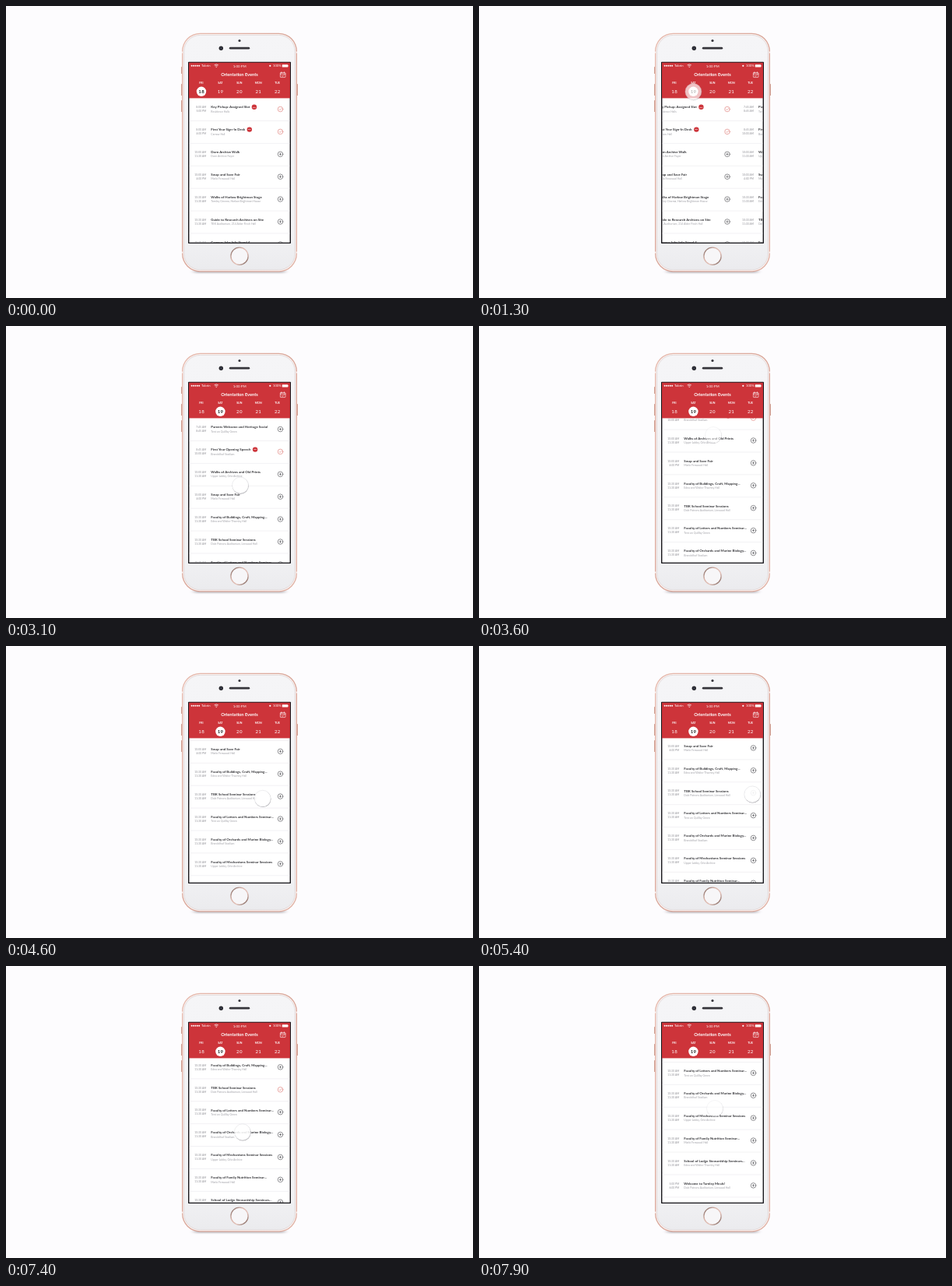
These frames come from a looping animation (600x375 px, 8 s). An HTML page:

```html
<!DOCTYPE html>
<html lang="en">
<head>
<meta charset="utf-8">
<title>Orientation Events</title>
<style>
html, body { margin: 0; width: 100%; height: 100%; overflow: hidden; background: #fdfcfe; }
svg { display: block; width: 100vw; height: 100vh; font-family: Lato, "Open Sans", sans-serif; }
.mid { text-anchor: middle; }
.time { text-anchor: end; font-size: 3.4px; fill: #929298; }
.name { font-size: 4.4px; font-weight: 700; fill: #303034; }
.place { font-size: 3.5px; fill: #a2a2a8; }
.line { stroke: #e9e8ec; stroke-width: .6; }
.icon { fill: none; stroke-width: .6; stroke-linecap: round; stroke-linejoin: round; }
.day { font-size: 3.5px; font-weight: 700; fill: #fff; }
.date { font-size: 6.1px; letter-spacing: .3px; fill: #fff; }
.date.on { font-weight: 700; fill: #222; }
</style>
</head>
<body>
<svg id="stage" viewBox="0 0 600 375">
  <defs>
    <linearGradient id="rose" x1="0" x2="1" y1="0" y2="1">
      <stop offset="0" stop-color="#e6b9ad"/><stop offset=".5" stop-color="#d8a598"/><stop offset="1" stop-color="#e0b1a5"/>
    </linearGradient>
    <linearGradient id="glass" x1="0" x2="0" y1="0" y2="1">
      <stop offset="0" stop-color="#f5f5f7"/><stop offset=".85" stop-color="#f2f2f4"/><stop offset="1" stop-color="#ebebee"/>
    </linearGradient>
    <linearGradient id="ring" x1="0" x2="1" y1="0" y2="1">
      <stop offset="0" stop-color="#6f5852"/><stop offset=".35" stop-color="#d9b5ab"/>
      <stop offset=".65" stop-color="#e3c0b7"/><stop offset="1" stop-color="#674f49"/>
    </linearGradient>
    <filter id="soft" x="-50%" y="-200%" width="200%" height="500%"><feGaussianBlur stdDeviation="3 1"/></filter>
    <filter id="drop" x="-40%" y="-40%" width="180%" height="180%"><feGaussianBlur stdDeviation=".6"/></filter>
    <clipPath id="view"><rect x="235.4" y="118" width="129.2" height="185.7"/></clipPath>
  </defs>

  <!-- phone body -->
  <rect x="242" y="339.5" width="116" height="3" rx="1.5" fill="#77717a" opacity=".6" filter="url(#soft)"/>
  <g fill="#cfa094">
    <rect x="225" y="78" width="2" height="9" rx=".6"/>
    <rect x="225" y="100" width="2" height="15" rx=".6"/>
    <rect x="225" y="121" width="2" height="15" rx=".6"/>
    <rect x="373" y="100" width="2" height="15" rx=".6"/>
  </g>
  <rect x="226" y="34.7" width="148" height="306.8" rx="23.4" fill="url(#rose)"/>
  <rect x="227.3" y="36" width="145.4" height="304.2" rx="22.1" fill="#fcf4f2"/>
  <rect x="228.7" y="37.4" width="142.6" height="301.4" rx="20.8" fill="url(#glass)" stroke="#dcd5d6" stroke-width=".8"/>
  <path d="M226 59.5h1.6M226 316.5h1.6M372.4 59.5h1.6M372.4 316.5h1.6" stroke="#f8eeeb" stroke-width="2"/>
  <circle cx="300" cy="44.5" r="1.6" fill="#34343a"/>
  <circle cx="276.3" cy="54.2" r="2.7" fill="#26262c"/>
  <circle cx="276.3" cy="54.2" r="1.1" fill="#3d4254"/>
  <rect x="286.8" y="52.7" width="26.4" height="2.9" rx="1.45" fill="#35343a"/>
  <circle cx="300" cy="321.2" r="11.1" fill="#f7f6f8" stroke="url(#ring)" stroke-width="1.3"/>

  <!-- screen -->
  <rect x="234" y="71.8" width="132" height="233.2" rx=".8" fill="#17161a"/>
  <rect x="235.4" y="73" width="129.2" height="230.7" fill="#fff"/>
  <g id="lists" clip-path="url(#view)"></g>
  <rect x="235" y="72.7" width="130" height="45.7" fill="#cd343a"/>
  <g id="status" fill="#fff" font-size="4.2">
    <text x="251" y="78.4">Tobrin</text>
    <text class="mid" x="300.2" y="78.5" font-size="4.5">1:00 PM</text>
    <text x="343" y="78.4">100%</text>
    <circle cx="339.3" cy="76.8" r="1.1"/>
    <rect x="354.8" y="75.2" width="7.4" height="3.4" rx=".6"/>
    <rect x="362.5" y="76.2" width=".6" height="1.4"/>
    <path d="M267.6 75.9q2.6-2 5.2 0M268.6 77.1q1.6-1.2 3.2 0" fill="none" stroke="#fff" stroke-width=".7"/>
    <circle cx="270.2" cy="78.3" r=".6"/>
  </g>
  <text class="mid" x="300" y="90" font-size="5.7" font-weight="700" fill="#fff">Orientation Events</text>
  <g class="icon" stroke="#fff">
    <rect x="352.4" y="85.6" width="6.6" height="6" rx=".7"/>
    <path d="M352.4 87.3h6.6M354 84.7v1.4M357.4 84.7v1.4M354.3 89.3l1.1 1 1.8-1.9"/>
  </g>
  <g id="week"></g>
  <g id="touch" opacity="0">
    <circle cx=".3" cy=".7" r="10.5" fill="#55525a" opacity=".55" filter="url(#drop)"/>
    <circle r="10.5" fill="#fff" stroke="#cfced3" stroke-width=".4"/>
  </g>
</svg>
<script>
const LOOP = 8000, STEP = 100, PITCH = 28.9, WIDTH = 129.2;
const $ = id => document.getElementById(id);

function add(parent, tag, attrs, text) {
  const el = document.createElementNS('http://www.w3.org/2000/svg', tag);
  for (const k in attrs) el.setAttribute(k, attrs[k]);
  if (text) el.textContent = text;
  return parent.appendChild(el);
}

const MORNING = ['10:30 AM', '11:30 AM'];
const friday = [
  ['8:00 AM', '5:00 PM', 'Key Pickup: Assigned Slot', 'Residence Halls', 'badge'],
  ['8:00 AM', '4:00 PM', 'First Year Sign-In Desk', 'Carrow Hall', 'badge'],
  ['10:00 AM', '11:30 AM', 'Dorn Archive Walk', 'Dorn Archive Foyer'],
  ['10:00 AM', '4:00 PM', 'Swap and Save Fair', 'Marla Fenwood Hall'],
  [...MORNING, 'Walks of Harlow Brightman Stage', 'Tarnley Cinema, Harlow Brightman House'],
  [...MORNING, 'Guide to Research Archives on Site', 'TBK Auditorium, 214 Alder Finch Hall'],
  [...MORNING, 'Campus Jobs Info Stand 4', 'Carrow Hall']
];
const places = ['Tent on Quillby Green', 'Brandelhof Stadium', 'Upper Lobby, Orla Archive',
  'Marla Fenwood Hall', 'Edna and Walter Thornby Hall', 'Dale Patrons Auditorium, Linwood Hall'];
const saturday = [
  ['7:45 AM', '8:45 AM', 'Parents Welcome and Heritage Social'],
  ['8:45 AM', '10:00 AM', 'First Year Opening Speech', 'badge'],
  ['10:00 AM', '11:30 AM', 'Walks of Archives and Old Prints'],
  ['10:00 AM', '4:00 PM', 'Swap and Save Fair'],
  [...MORNING, 'Faculty of Buildings, Craft, Mapping...'],
  [...MORNING, 'TBK School Seminar Sessions'],
  [...MORNING, 'Faculty of Letters and Numbers Seminar...'],
  [...MORNING, 'Faculty of Orchards and Marine Biology...'],
  [...MORNING, 'Faculty of Mechanisms Seminar Sessions'],
  [...MORNING, 'Faculty of Family Nutrition Seminar...'],
  [...MORNING, 'School of Lodge Stewardship Seminars...'],
  ['5:00 PM', '6:00 PM', 'Welcome to Tarnley Meals!'],
  ['6:00 PM', '7:00 PM', 'Evening Garden Social']
].map(([from, to, name, badge], i) => [from, to, name, places[i % 6], badge]);

function setIcon(el, done) {
  el.setAttribute('stroke', done ? '#dc7470' : '#4a4a50');
  el.lastChild.setAttribute('d', done ? 'M-1.4 .1l1 1 1.9-2' : 'M-1.3 0h2.6M0-1.3v2.6');
}

function buildList(rows) {
  const list = add($('lists'), 'g');
  const icons = rows.map(([from, to, name, place, badge], i) => {
    const row = add(list, 'g', { transform: `translate(0 ${118.5 + i * PITCH})` });
    add(row, 'text', { class: 'time', x: 257.2, y: 12.8 }, from);
    add(row, 'text', { class: 'time', x: 257.2, y: 17.8 }, to);
    const title = add(row, 'text', { class: 'name', x: 263.3, y: 12.9 }, name);
    add(row, 'text', { class: 'place', x: 263.3, y: 18.2 }, place);
    add(row, 'line', { class: 'line', x1: 235.4, x2: 364.6, y1: 29, y2: 29 });
    if (badge) {
      const x = 263.3 + title.getComputedTextLength() + 5.6;
      add(row, 'circle', { cx: x, cy: 11.2, r: 3.2, fill: '#cd343a' });
      add(row, 'text', { class: 'mid', x, y: 12.1, 'font-size': 2.5, 'font-weight': 700, fill: '#fff' }, 'RQ');
    }
    const icon = add(row, 'g', { class: 'icon', transform: 'translate(352.5 14)' });
    add(icon, 'circle', { r: 3.3 });
    add(icon, 'path');
    setIcon(icon, !!badge);
    return icon;
  });
  return { list, icons };
}

const fri = buildList(friday), sat = buildList(saturday);

for (let i = 0; i < 5; i++) add($('status'), 'circle', { cx: 238.6 + i * 2.4, cy: 76.8, r: .95 });

const dayX = i => 251 + i * 24.4;
const marker = add($('week'), 'circle', { cy: 109.8, r: 6.2, fill: '#fff' });
const dates = ['FRI', 'SAT', 'SUN', 'MON', 'TUE'].map((day, i) => {
  add($('week'), 'text', { class: 'day mid', x: dayX(i), y: 99.7 }, day);
  return add($('week'), 'text', { class: 'date mid', x: dayX(i) + .15, y: 112 }, String(18 + i));
});

// time, x, y, opacity
const path = [
  [500, 298, 180, 0], [800, 290, 150, .8], [1100, 275.4, 110, .8], [1300, 275.4, 110, .7],
  [1600, 275.4, 110, 0], [2500, 301, 212, 0], [2900, 301, 212, .9], [3200, 301, 202, .9],
  [3600, 301, 140, .5], [3900, 303, 142, .5], [4600, 329.7, 195.8, .9], [5100, 351.2, 190.4, .9],
  [5800, 351.2, 190.4, .9], [6700, 305, 201, .9], [6900, 305, 201, .9], [7250, 304, 218, .9],
  [7900, 303, 183, .5]
];
const ease = p => p * p * (3 - 2 * p);
const clamp = p => Math.max(0, Math.min(1, p));

function touchAt(t) {
  const n = path.findIndex(k => k[0] > t);
  if (n === 0) return path[0];
  if (n < 0) return path[path.length - 1];
  const a = path[n - 1], b = path[n], p = ease((t - a[0]) / (b[0] - a[0]));
  return a.map((v, i) => v + (b[i] - v) * p);
}

// a flick decays exponentially towards its distance
const flick = (t, start, distance) => t < start ? 0 : distance * (1 - Math.exp(-2.14 * (t - start) / 1000));

function draw(t) {
  const slide = ease(clamp((t - 1200) / 300));
  const scroll = flick(t, 3290, 89.3) + flick(t, 7250, 105.5);
  fri.list.setAttribute('transform', `translate(${-slide * WIDTH} 0)`);
  sat.list.setAttribute('transform', `translate(${(1 - slide) * WIDTH} ${-scroll})`);
  setIcon(sat.icons[5], t >= 5700);

  const day = t >= 1200 ? 1 : 0;
  marker.setAttribute('cx', dayX(day));
  dates.forEach((el, i) => el.classList.toggle('on', i === day));

  const [, x, y, opacity] = touchAt(t);
  $('touch').setAttribute('transform', `translate(${x} ${y})`);
  $('touch').setAttribute('opacity', opacity);
}

const began = performance.now();
function tick() {
  const t = (performance.now() - began) % LOOP;
  draw(Math.floor(t / STEP) * STEP);
  requestAnimationFrame(tick);
}
tick();
</script>
</body>
</html>
```
